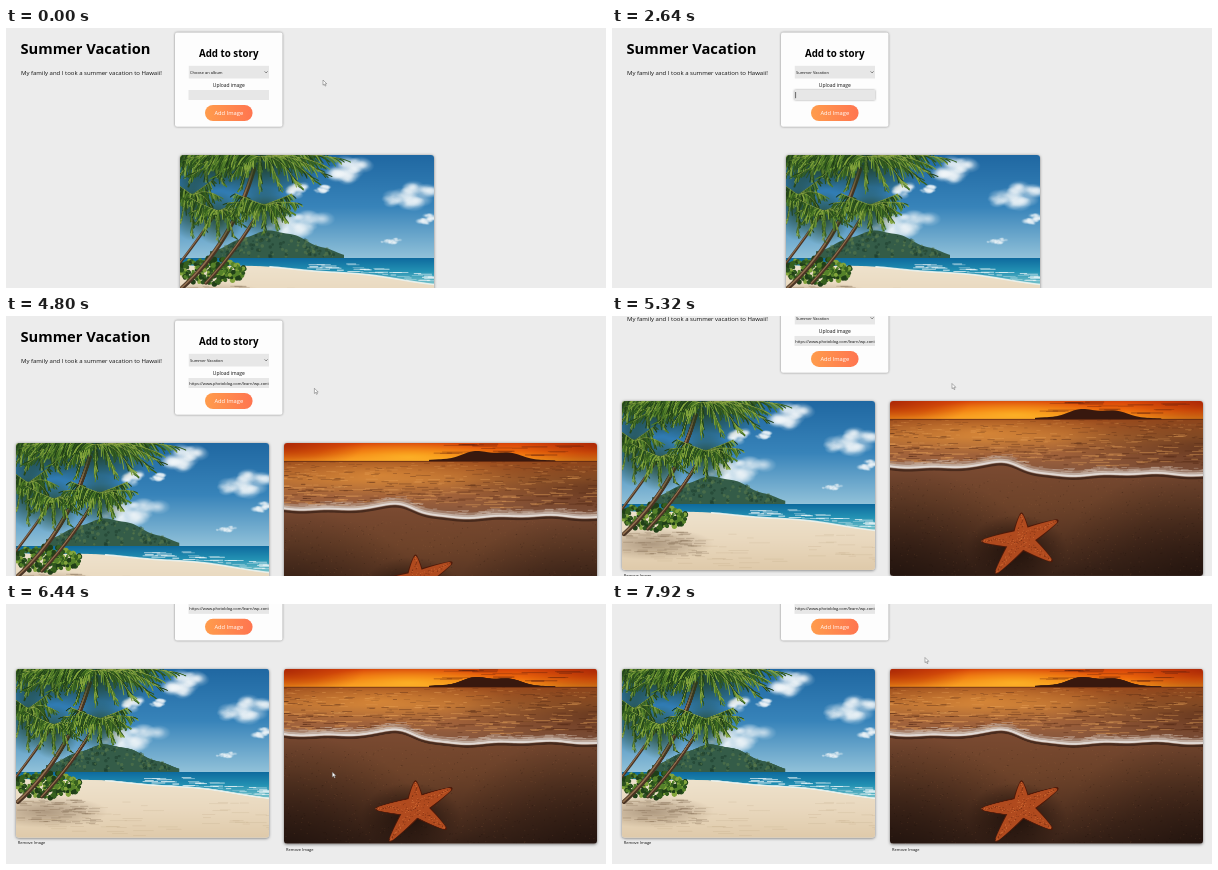
These frames come from a looping animation (600 px wide and 260 px high, 8 s). An HTML page with a canvas:

```html
<!DOCTYPE html>
<html lang="en">
<head>
<meta charset="utf-8">
<title>Summer Vacation</title>
<style>
  html, body { margin: 0; width: 100%; height: 100%; overflow: hidden; background: #ececec; }
  #stage { position: relative; width: 600px; height: 260px; overflow: hidden; background: #ececec; }
  #page { position: absolute; left: 0; top: 0; width: 600px; height: 340px; }
  svg { position: absolute; left: 0; top: 0; overflow: visible; }
  text { font-family: "Open Sans", "Noto Sans", sans-serif; fill: #111; }
  .bold { font-weight: 700; fill: #000; }
  .small { font-size: 4px; }
  canvas { position: absolute; top: 127.2px; border-radius: 3px; box-shadow: 0 .6px 3px rgba(0,0,0,.5); }
  #beach { width: 253.5px; height: 169px; }
  #sunset { left: 278.2px; width: 313px; height: 175px; }
  .card { filter: drop-shadow(0 .5px 1.2px rgba(0,0,0,.45)); }
  .lift { filter: drop-shadow(.4px .6px .8px rgba(0,0,0,.4)); }
</style>
</head>
<body>
<div id="stage">
  <div id="page">
    <canvas id="beach"></canvas>
    <canvas id="sunset"></canvas>
    <svg width="600" height="340">
      <defs>
        <linearGradient id="warm"><stop stop-color="#ff9c4c"/><stop offset="1" stop-color="#ff7550"/></linearGradient>
        <linearGradient id="warmFlip"><stop stop-color="#ff7550"/><stop offset="1" stop-color="#ffa04c"/></linearGradient>
        <clipPath id="field"><rect x="182.5" y="62" width="80.3" height="10.5"/></clipPath>
      </defs>
      <text class="bold" x="14.5" y="25.7" font-size="14.7">Summer Vacation</text>
      <text x="15" y="47" font-size="6">My family and I took a summer vacation to Hawaii!</text>
      <rect class="card" x="169" y="4.5" width="107.5" height="94.2" rx="2" fill="#fdfdfd"/>
      <text class="bold" x="222.7" y="28.5" font-size="9.75" text-anchor="middle">Add to story</text>
      <rect x="182.8" y="37.8" width="80.2" height="12.7" fill="#e7e7e7"/>
      <text id="choice" class="small" x="184" y="45.8"></text>
      <path d="M258.6 43.4l1.5 1.5 1.5-1.5" fill="none" stroke="#333" stroke-width=".6"/>
      <text x="222.8" y="59" font-size="4.95" text-anchor="middle">Upload image</text>
      <rect id="input" x="182.5" y="62" width="80.5" height="10" fill="#e7e7e7"/>
      <g clip-path="url(#field)">
        <text id="url" class="small" x="183.2" y="68.7">https://www.photoblog.com/learn/wp-content/uploads</text>
      </g>
      <path id="caret" d="M183.6 64v6.2" stroke="#111" stroke-width=".6"/>
      <rect id="button" x="199" y="77" width="47.6" height="16" rx="8"/>
      <text x="222.8" y="87.1" font-size="5.75" text-anchor="middle" style="fill:#fff">Add Image</text>
      <g id="list">
        <rect x="183" y="50.4" width="79.8" height="12.2" fill="#ebebeb" stroke="#777" stroke-width=".5"/>
        <rect id="mark" x="183.2" width="79.4" height="5.8" fill="#1f78d2"/>
        <text id="opt0" class="small" x="184.5" y="55">Choose an album</text>
        <text id="opt1" class="small" x="184.5" y="60.8">Summer Vacation</text>
      </g>
      <text id="remove0" class="small" y="302.6">Remove Image</text>
      <text id="remove1" class="small" x="280" y="309.7">Remove Image</text>
    </svg>
  </div>
  <svg width="600" height="260">
    <path id="arrow" d="M0 0v5.2l1.2-1.1.9 2 .9-.4-.9-1.9h1.7z" fill="#fff" stroke="#555" stroke-width=".45"/>
    <path id="hand" d="M0 0q.9-.5 1 .4v1.6l2.2.6q.7.3.5 1.1l-.5 2h-2.7l-1.8-2.3q.1-.9 1.3 0z" fill="#fff" stroke="#444" stroke-width=".35"/>
  </svg>
</div>
<script>
const $ = id => document.getElementById(id);
const LOOP = 8000, OPEN = 950, PICK = 1980, FOCUS = 2450, PASTE = 3080, BLUR = 4100, ADD = 4360;

// Pointer moves: leave, arrive, x, y
const moves = [
  [200, 800, 231, 42.5], [1500, 1800, 222, 59], [2050, 2400, 225, 66], [3400, 3750, 234, 83.5],
  [4450, 5000, 340, 67.5], [5650, 6300, 326.3, 168], [6600, 7500, 313, 53.5]
];

const clamp = v => Math.max(0, Math.min(1, v));
const smooth = p => p * p * (3 - 2 * p);
const bell = v => Math.exp(-v * v);
const show = (id, on) => $(id).style.display = on ? '' : 'none';

function pointer(t) {
  let x = 317, y = 52;
  for (const [a, b, tx, ty] of moves) {
    const p = smooth(clamp((t - a) / (b - a)));
    x += (tx - x) * p;
    y += (ty - y) * p;
  }
  return [x, y];
}

function seeded(s) {
  return () => (s = (s * 16807) % 2147483647) / 2147483647;
}

function setup(id, w, h) {
  const c = $(id), g = c.getContext('2d');
  c.width = w * 2;
  c.height = h * 2;
  g.scale(2, 2);
  g.lineCap = 'round';
  return g;
}

function fade(g, y0, y1, ...colors) {
  const f = g.createLinearGradient(0, y0, 0, y1);
  colors.forEach((c, i) => f.addColorStop(i / (colors.length - 1), c));
  return f;
}

function glow(g, x, y, rx, ry, rgb, alpha) {
  const f = g.createRadialGradient(0, 0, 0, 0, 0, 1);
  f.addColorStop(0, `rgba(${rgb},${alpha})`);
  f.addColorStop(1, `rgba(${rgb},0)`);
  g.save();
  g.translate(x, y);
  g.scale(rx, ry);
  g.fillStyle = f;
  g.fillRect(-1, -1, 2, 2);
  g.restore();
}

function dot(g, x, y, r, color) {
  g.fillStyle = color;
  g.beginPath();
  g.arc(x, y, r, 0, 7);
  g.fill();
}

function curve(g, x, y, cx, cy, tx, ty, width, color) {
  g.beginPath();
  g.moveTo(x, y);
  g.quadraticCurveTo(cx, cy, tx, ty);
  g.strokeStyle = color;
  g.lineWidth = width;
  g.stroke();
}

const dash = (g, x, y, l, width, color) => curve(g, x, y, x + l / 2, y, x + l, y, width, color);

// Path along y = f(x)
function along(g, f, x0, x1) {
  g.beginPath();
  for (let x = x0; x <= x1; x += 2) g.lineTo(x, f(x));
}

function fillBelow(g, f, x0, x1, bottom, color) {
  along(g, f, x0, x1);
  g.lineTo(x1, bottom);
  g.lineTo(x0, bottom);
  g.fillStyle = color;
  g.fill();
}

function strokeAlong(g, f, x0, x1, width, color) {
  along(g, f, x0, x1);
  g.strokeStyle = color;
  g.lineWidth = width;
  g.stroke();
}

function paintBeach() {
  const W = 254, H = 169, g = setup('beach', W, H), rnd = seeded(41);
  const greens = ['#203f18', '#36601e', '#55822a', '#83a53c', '#2c5220'];
  const green = () => greens[Math.floor(rnd() * 5)];

  g.fillStyle = fade(g, 0, 104, '#2068a2', '#3884ba', '#93c3da');
  g.fillRect(0, 0, W, H);

  const cloud = (x, y, w, h) => {
    for (let i = 0; i < 34; i++) {
      const u = rnd() + rnd() - 1, r = h * (.15 + rnd() * .2);
      glow(g, x + u * w / 2, y + (rnd() - .5) * h * (1 - Math.abs(u)) - u * h * .25, r * 1.6, r, '244,248,250', .5);
    }
  };
  cloud(168, 14, 36, 22);
  cloud(230, 41, 54, 22);
  cloud(143, 34, 18, 8);
  cloud(118, 34, 24, 13);
  cloud(112, 70, 70, 24);
  cloud(212, 86, 26, 6);
  cloud(248, 64, 18, 10);

  const hill = x => 103 - 27 * bell((x - 92) / 52) + Math.sin(x / 5) * .8;
  fillBelow(g, hill, 30, 164, 104, '#345c48');
  for (let i = 0; i < 130; i++) {
    const x = 40 + rnd() * 115, y = hill(x);
    dot(g, x, y + rnd() * (102 - y), .6 + rnd() * 1.4, i % 2 ? 'rgba(26,58,42,.5)' : 'rgba(92,124,76,.5)');
  }

  g.fillStyle = fade(g, 103, 130, '#0e6a9e', '#2492b4', '#7cc6cc');
  g.fillRect(0, 103, W, 30);
  const shore = x => 110 + 19 * (x / W) ** 2 + Math.sin(x / 17) * .7;
  fillBelow(g, shore, 0, W, H, fade(g, 111, H, '#eee2cc', '#e9d8be', '#dfcaaa'));
  strokeAlong(g, shore, 90, W, 1.6, 'rgba(238,244,240,.9)');
  for (let i = 0; i < 45; i++) {
    const x = 125 + rnd() * 125;
    dash(g, x, shore(x) - 1 - rnd() * 8, 4 + rnd() * 12, .4 + rnd() * .9, 'rgba(236,246,248,.7)');
  }

  // Palm shade and ripples on the sand
  glow(g, 30, 143, 62, 16, '128,104,80', .55);
  for (let i = 0; i < 70; i++) dash(g, rnd() * 75, 131 + rnd() * 24, 4 + rnd() * 9, 1.1, 'rgba(118,94,70,.25)');
  for (let i = 0; i < 60; i++) dash(g, rnd() * W, 133 + rnd() * 34, 5 + rnd() * 15, 1, 'rgba(176,148,114,.16)');

  // Undergrowth
  for (let i = 0; i < 240; i++) {
    const a = rnd() * 7, r = Math.sqrt(rnd());
    dot(g, 31 + Math.cos(a) * r * 34, 116 + Math.sin(a) * r * 13, 1 + rnd() * 2, green());
  }

  const trunk = (width, ...pts) => {
    curve(g, ...pts, width, '#4a3424');
    curve(g, ...pts.map((v, i) => v - (i % 2 ? 0 : width / 5)), width * .35, '#92704f');
  };
  trunk(2.6, 0, 108, 20, 82, 36, 58);
  trunk(3.4, 26, 128, 58, 94, 82, 52);
  trunk(4.4, 2, 133, 52, 88, 74, 14);

  // Fan of drooping fronds; density is leaflets per frond
  const crown = (x, y, rx, ry, fronds, len) => {
    glow(g, x, y + ry * .25, rx * .8, ry * .9, '34,62,26', .85);
    for (let k = 0; k < fronds; k++) {
      const a = Math.PI * (k / (fronds - 1) * 1.3 - .15), s = .75 + rnd() * .3;
      const dx = Math.cos(a) * rx * s, dy = Math.sin(a) * ry * s;
      for (let p = 0; p < 1; p += .026) {
        const px = x + dx * p, py = y + dy * p * p - ry * .35 * p * (1 - p);
        const l = len * (.3 + Math.sin(Math.PI * p)) * (.5 + rnd() * .7);
        const sway = dx * .12 + (rnd() - .5) * 5;
        curve(g, px, py, px + sway * .6, py + l * .4, px + sway, py + l, 1, green());
      }
      curve(g, x, y, x + dx * .5, y - ry * .18, x + dx, y + dy, .5, '#98a84c');
    }
  };
  crown(12, 40, 28, 40, 9, 9);
  crown(38, 56, 32, 30, 9, 8);
  crown(84, 50, 36, 28, 11, 9);
  crown(26, 2, 52, 30, 13, 11);
  crown(80, 2, 78, 34, 17, 11);
}

function paintSunset() {
  const W = 313, H = 175, g = setup('sunset', W, H), rnd = seeded(97);
  g.fillStyle = fade(g, 0, 18, '#d8440a', '#ee6a0c', '#fa9a1c');
  g.fillRect(0, 0, W, 20);
  glow(g, 125, 14, 95, 16, '255,190,40', .75);
  for (const x of [0, W]) glow(g, x, 2, 80, 26, '150,25,5', .65);
  for (let i = 0; i < 24; i++) {
    const x = 150 + rnd() * 130;
    dash(g, x, 1 + rnd() * 12, 10 + rnd() * 26, .5 + rnd(), 'rgba(95,30,12,.4)');
  }

  g.fillStyle = fade(g, 18, 74, '#9a4a1c', '#b56c32', '#a0623c', '#805540');
  g.fillRect(0, 18, W, 60);
  glow(g, 95, 32, 130, 22, '250,165,65', .5);
  glow(g, W, 46, 150, 36, '62,28,18', .6);
  for (let i = 0; i < 480; i++) {
    const y = 19 + rnd() * 46, depth = (y - 18) / 46;
    const color = i % 2 ? 'rgba(82,38,18,.42)' : 'rgba(244,176,96,.36)';
    dash(g, rnd() * (W + 20) - 20, y, 2 + rnd() * (4 + depth * 14), .4 + depth * .8, color);
  }
  const ridge = x => 18 - 10 * bell((x - 205) / 38) - 1.6 * Math.sin(x / 7) * bell((x - 205) / 45);
  fillBelow(g, ridge, 145, 272, 18.5, '#38180e');
  dash(g, 0, 18.3, W, .8, 'rgba(78,30,12,.7)');

  const edge = x => 65 + 8 / (1 + Math.exp((130 - x) / 9)) - 5 * bell((x - 118) / 20)
    + Math.sin(x / 9) * .7 + Math.sin(x / 23);
  fillBelow(g, edge, 0, W + 2, H, fade(g, 64, H, '#7a4a32', '#684029', '#4f3020', '#382218'));
  glow(g, 140, 105, 130, 70, '138,82,48', .25);
  for (const x of [0, W]) glow(g, x, H, 150, 110, '18,9,7', .55);
  for (let i = 0; i < 700; i++) {
    g.fillStyle = i % 2 ? 'rgba(22,10,6,.22)' : 'rgba(180,116,76,.16)';
    g.fillRect(rnd() * W, 78 + rnd() * 97, .9, .9);
  }
  // Foam: soft layers from wet sand up to the crest
  const foam = (shift, width, color) => strokeAlong(g, x => edge(x) + shift, -2, W + 4, width, color);
  foam(3, 2.6, 'rgba(42,24,18,.6)');
  foam(-1.5, 7, 'rgba(188,164,150,.5)');
  foam(-.5, 4, 'rgba(206,192,184,.7)');
  foam(.3, 1.8, 'rgba(232,226,222,.85)');
  for (let i = 0; i < 90; i++) {
    const x = rnd() * W;
    dash(g, x, edge(x) - 2 - rnd() * 5, 3 + rnd() * 8, .9, 'rgba(214,194,180,.4)');
  }

  // Starfish: five tapered arms as angle in degrees and length
  const arms = [[-90, 26], [-27, 41], [36, 38], [127, 43], [177, 40]];
  const star = (grow, color) => {
    g.fillStyle = color;
    for (const [deg, len] of arms) {
      const w = 10 + grow;
      g.save();
      g.translate(131.5, 138);
      g.rotate(deg * Math.PI / 180);
      g.beginPath();
      g.moveTo(-4, -w);
      g.quadraticCurveTo(len * .55, -w * .65, len + grow - 2, -1.8);
      g.quadraticCurveTo(len + grow + 1, 0, len + grow - 2, 1.8);
      g.quadraticCurveTo(len * .55, w * .65, -4, w);
      g.fill();
      g.restore();
    }
  };
  glow(g, 127, 148, 50, 34, '14,6,4', .7);
  star(1, '#4e1a0a');
  star(-.6, fade(g, 112, 172, '#b04a1e', '#9c3c16', '#7e2c10'));
  for (const [deg, len] of arms) {
    const c = Math.cos(deg * Math.PI / 180), s = Math.sin(deg * Math.PI / 180);
    for (let r = 0; r < len; r += .8) {
      const off = (rnd() - .5) * 12 * (1 - r / len);
      dot(g, 131.5 + c * r - s * off, 138 + s * r + c * off, .45, rnd() < .5 ? 'rgba(224,122,62,.7)' : 'rgba(86,28,10,.6)');
    }
  }
}

function draw(now) {
  const t = now % LOOP;
  const [x, y] = pointer(t);
  const added = t >= ADD, open = t >= OPEN && t < PICK, focus = t >= FOCUS && t < BLUR;
  const roll = clamp((t - 5140) / 420), scroll = 62.2 * (1 - (1 - roll) ** 2);
  const hover = x > 199 && x < 247 && y + scroll > 77 && y + scroll < 93;

  $('page').style.transform = `translateY(${-scroll}px)`;
  $('beach').style.left = (added ? 9.8 : 174) + 'px';
  $('remove0').setAttribute('x', added ? 11.8 : 176);
  show('sunset', added);
  show('remove1', added);

  $('choice').textContent = t < PICK ? 'Choose an album' : 'Summer Vacation';
  show('list', open);
  const row = y > 56.5 ? 1 : 0;
  $('mark').setAttribute('y', row ? 56.5 : 50.6);
  $('opt0').style.fill = row ? '#111' : '#fff';
  $('opt1').style.fill = row ? '#fff' : '#111';

  $('input').setAttribute('class', focus ? 'lift' : '');
  show('url', t >= PASTE);
  show('caret', focus && t < PASTE && (t - FOCUS) % 1060 < 530);
  $('button').setAttribute('fill', `url(#${hover ? 'warmFlip' : 'warm'})`);

  show('arrow', !hover && !(t >= FOCUS && t < 3450));
  show('hand', hover);
  $(hover ? 'hand' : 'arrow').setAttribute('transform', `translate(${x} ${y})`);
}

paintBeach();
paintSunset();
const start = performance.now();
function tick() {
  draw(performance.now() - start);
  requestAnimationFrame(tick);
}
tick();
</script>
</body>
</html>
```
